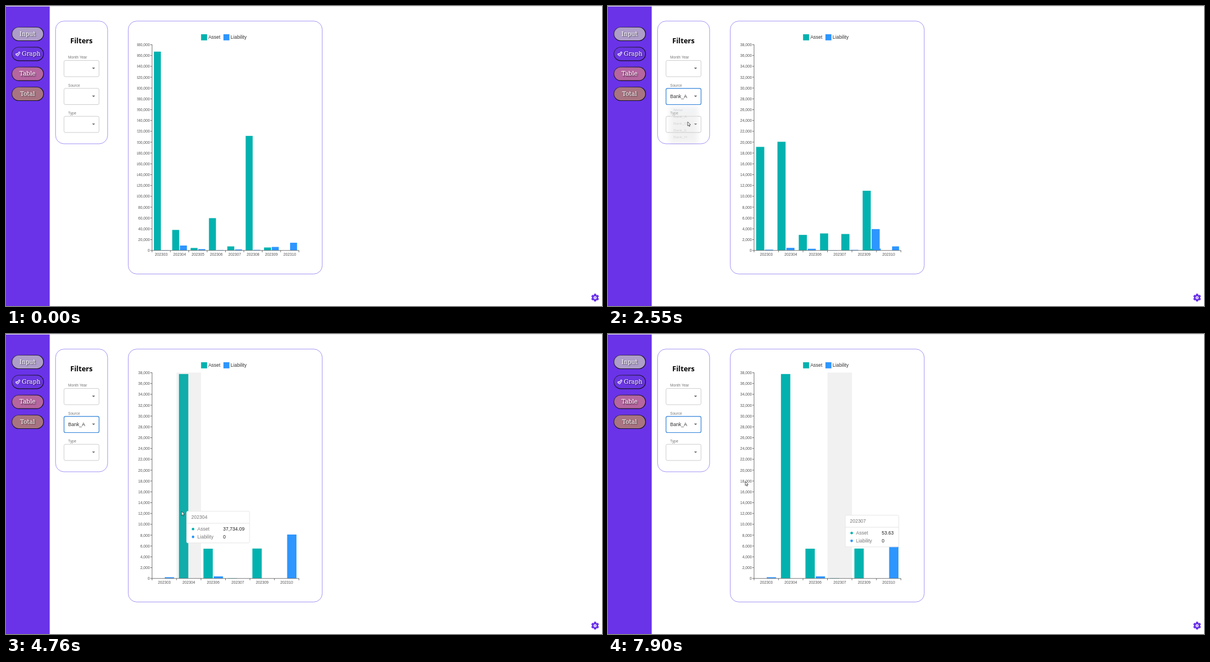
These frames come from a looping animation (1055 by 531 pixels, 8 s). An HTML page with a canvas:

```html
<!DOCTYPE html>
<html lang="en">
<head>
<meta charset="utf-8">
<title>Asset dashboard</title>
<style>
html, body { margin: 0; width: 100%; height: 100%; overflow: hidden; background: #fff; }
canvas { display: block; }
</style>
</head>
<body>
<canvas id="stage" width="1055" height="531"></canvas>
<script>
const ctx = document.getElementById('stage').getContext('2d');
const LOOP = 8000, ENTER = 460, OPEN = 1640, PICK = 2430, LEAVE = 7900, LAG = 60;
const PURPLE = '#6a33e8', OUTLINE = '#8f78f0', BLUE = '#2f82da', GREY = '#cdcdcd';
const COLORS = ['#02b2af', '#2e96ff'];
const SERIES = ['Asset', 'Liability'];
const SANS = '"Liberation Sans", Arial, sans-serif';
const PLOT = { left: 258.5, top: 68.3, width: 260, height: 364.2 };
PLOT.right = PLOT.left + PLOT.width;
PLOT.bottom = PLOT.top + PLOT.height;

// Asset and liability per month from 202303 on; null marks a month without entries.
const byMonth = pairs => pairs
  .map((pair, i) => pair && { month: 202303 + i, values: pair })
  .filter(Boolean);
const ALL = {
  tick: 20000,
  rows: byMonth([[367000, 500], [37734.09, 8900], [4400, 2300], [59500, 600],
    [7300, 1700], [211400, 900], [5300, 6300], [0, 14050]])
};
const BANK_A = {
  tick: 2000,
  rows: byMonth([[0, 206.83], [37734.09, 0], null, [5476.21, 362.15],
    [53.63, 0], null, [5503.18, 0], [0, 8094.37]])
};
const TICKS = 19;

// Pointer strokes; it rests between them.
const ENTRY = { x: 890, y: 421 };
const STROKES = [
  { from: ENTER, to: 1240, x: 143, y: 159 },
  { from: 1940, to: 2270, x: 141, y: 205 },
  { from: 2560, to: 3200, x: 260, y: 282 },
  { from: 3200, to: 3510, x: 270, y: 312 },
  { from: 4130, to: 4700, x: 310.8, y: 314 },
  { from: 5040, to: 5430, x: 363, y: 336.5 },
  { from: 6170, to: 6500, x: 411, y: 340.5 },
  { from: 6600, to: 7070, x: 446, y: 344 },
  { from: 7260, to: 7440, x: 503, y: 350 },
  { from: 7840, to: 7840, x: 411, y: 321 },
  { from: LEAVE, to: LEAVE, x: 243, y: 261 }
];

const clamp = v => Math.max(0, Math.min(1, v));
const mix = (a, b, p) => a + (b - a) * p;
const progress = (t, from, to) => to > from ? clamp((t - from) / (to - from)) : +(t >= to);
const easeOut = p => Math.sin(p * Math.PI / 2);

function pointer(t) {
  return STROKES.reduce((at, stroke) => {
    const p = easeOut(progress(t, stroke.from, stroke.to));
    return { x: mix(at.x, stroke.x, p), y: mix(at.y, stroke.y, p) };
  }, ENTRY);
}

function text(str, x, y, size, color, { align = 'left', style = '', family = SANS } = {}) {
  ctx.font = `${style} ${size}px ${family}`;
  ctx.textAlign = align;
  ctx.fillStyle = color;
  ctx.fillText(str, x, y);
}

function rect(x, y, w, h, color) {
  ctx.fillStyle = color;
  ctx.fillRect(x, y, w, h);
}

function box(x, y, w, h, r, fill, stroke, width = 1) {
  ctx.beginPath();
  ctx.roundRect(x, y, w, h, r);
  if (fill) { ctx.fillStyle = fill; ctx.fill(); }
  if (stroke) { ctx.strokeStyle = stroke; ctx.lineWidth = width; ctx.stroke(); }
}

function polygon(points, fill) {
  ctx.beginPath();
  points.forEach(([x, y]) => ctx.lineTo(x, y));
  ctx.closePath();
  ctx.fillStyle = fill;
  ctx.fill();
}

function line(x1, y1, x2, y2, color, width = .8) {
  ctx.beginPath();
  ctx.moveTo(x1, y1);
  ctx.lineTo(x2, y2);
  ctx.strokeStyle = color;
  ctx.lineWidth = width;
  ctx.stroke();
}

function dot(x, y, r, color) {
  ctx.beginPath();
  ctx.arc(x, y, r, 0, 7);
  ctx.fillStyle = color;
  ctx.fill();
}

function withShadow(color, blur, dx, dy, paint) {
  ctx.save();
  Object.assign(ctx, { shadowColor: color, shadowBlur: blur, shadowOffsetX: dx, shadowOffsetY: dy });
  paint();
  ctx.restore();
}

function button(label, y, fill, textX = 38) {
  const edge = ctx.createLinearGradient(10, y, 20, y + 25);
  edge.addColorStop(0, 'rgba(40,30,60,.6)');
  edge.addColorStop(1, '#16101f');
  box(10.5, y + .5, 56, 24, 12, fill, edge, 1.2);
  withShadow('rgba(0,0,0,.6)', 2, 1.3, 1.3, () =>
    text(label, textX, y + 15.8, 10.4, '#fff', { align: 'center', family: '"DejaVu Serif", serif' }));
}

function check(color, width) {
  ctx.beginPath();
  ctx.moveTo(18.6, 85.6);
  ctx.lineTo(20.4, 87);
  ctx.lineTo(23.4, 82.6);
  ctx.strokeStyle = color;
  ctx.lineWidth = width;
  ctx.stroke();
}

function sidebar() {
  rect(0, 0, 1055, 1, '#e6e6e8');
  rect(0, 1, 77.4, 530, PURPLE);
  button('Input', 37, '#ad9dc8');
  button('Graph', 72.3, '#6a35e2', 44.5);
  button('Table', 107.6, '#b5669f');
  button('Total', 143, '#a87482');
  ctx.save();
  ctx.lineCap = ctx.lineJoin = 'round';
  check('#fff', 3.4);
  check(PURPLE, 1.2);
  ctx.restore();
}

function gear() {
  ctx.save();
  ctx.translate(1042.8, 516.2);
  dot(0, 0, 5.2, PURPLE);
  for (let i = 0; i < 6; i++) {
    polygon([[-2.4, -4], [-1.6, -6.9], [1.6, -6.9], [2.4, -4]], PURPLE);
    ctx.rotate(Math.PI / 3);
  }
  dot(0, 0, 2.5, '#fff');
  dot(0, 0, 1, PURPLE);
  ctx.restore();
}

function select(label, slot, { border = GREY, width = 1, value = '', open = false } = {}) {
  const y = 96 + 49.4 * slot, arrowY = y + 14.4, s = open ? -1 : 1;
  text(label, 110, y - 2.8, 6.6, '#777');
  box(102.7, y + .4, 62, 28.7, 2.5, null, border, width);
  text(value, 110, y + 17.4, 8.6, '#333');
  polygon([[152.3, arrowY - 1.3 * s], [157.7, arrowY - 1.3 * s], [155, arrowY + 1.4 * s]], '#666');
}

function filters(t, at) {
  box(87.7, 26.7, 92.2, 217.2, 15, '#fff', OUTLINE, .8);
  text('Filters', 133.6, 66.3, 12.6, '#000', { align: 'center', style: 'bold', family: '"Open Sans", sans-serif' });
  const hover = at.x > 103 && at.x < 165 && at.y > 146 && at.y < 175;
  const focused = t >= OPEN;
  select('Month Year', 0);
  select('Source', 1, {
    border: focused ? BLUE : hover ? '#222' : GREY,
    width: focused ? 1.2 : 1,
    value: t >= PICK ? 'Bank_A' : '',
    open: focused && t < PICK
  });
  select('Type', 2);
}

function menu(t, at) {
  const shown = easeOut(progress(t, OPEN, OPEN + 200)) - easeOut(progress(t, PICK, PICK + 200));
  if (shown <= 0) return;
  ctx.save();
  ctx.globalAlpha = shown;
  ctx.translate(134, 176);
  ctx.scale(mix(.75, 1, shown), mix(.56, 1, shown));
  ctx.translate(-134, -176);
  withShadow('rgba(0,0,0,.36)', 7, 0, 2, () => box(103, 176.5, 62, 99.5, 2, '#fff'));
  rect(103, 179, 62, 18.6, '#edf4fb');
  ['None', 'Bank_A', 'Bank_C', 'Bank_E', 'Bank_H'].forEach((name, i) => {
    const y = 179 + 18.6 * i;
    if (i && at.y >= y && at.y < y + 18.6) rect(103, y, 62, 18.6, '#f5f5f5');
    text(name, 111, y + 12.3, 8.6, i ? '#555' : '#333', { style: i ? '' : 'italic' });
  });
  ctx.restore();
}

const bandWidth = data => PLOT.width / data.rows.length;

function barShape(data, i, series) {
  const step = bandWidth(data), w = step * .8 / 2.1;
  return {
    x: PLOT.left + step * (i + .1) + series * w * 1.1,
    w,
    h: data.rows[i].values[series] / (data.tick * TICKS) * PLOT.height
  };
}

// Bars settle like a critically damped spring after the pick.
function bars(t) {
  const s = Math.max(0, t - PICK) / 75;
  const p = 1 - (1 + s) * Math.exp(-s);
  ALL.rows.forEach((_, i) => COLORS.forEach((color, series) => {
    const a = barShape(ALL, i, series);
    const b = BANK_A.rows[i] ? barShape(BANK_A, i, series) : { ...a, h: 0 };
    const h = mix(a.h, b.h, p);
    if (h > .05) rect(mix(a.x, b.x, p), PLOT.bottom - h, mix(a.w, b.w, p), h, color);
  }));
}

function axes(data) {
  const ink = '#555', step = bandWidth(data);
  line(PLOT.left, PLOT.top - .3, PLOT.left, PLOT.bottom + .5, ink);
  line(PLOT.left, PLOT.bottom + .2, PLOT.right, PLOT.bottom + .2, ink);
  ctx.save();
  ctx.beginPath();
  ctx.rect(232, 40, 310, 420);
  ctx.clip();
  for (let i = 0; i <= TICKS; i++) {
    const y = mix(PLOT.bottom, PLOT.top, i / TICKS) + .2;
    line(255.3, y, PLOT.left, y, ink);
    text((data.tick * i).toLocaleString('en-US'), 254.6, y + 2.5, 6.75, ink, { align: 'right' });
  }
  data.rows.forEach(({ month }, i) =>
    text(month, PLOT.left + step * (i + .5), 442, 6.75, ink, { align: 'center' }));
  for (let i = 0; i <= data.rows.length; i++) {
    const x = PLOT.left + step * i;
    line(x, PLOT.bottom, x, PLOT.bottom + 3.4, ink);
  }
  ctx.restore();
}

function tooltip(at, { month, values }) {
  const labels = values.map(v => v.toLocaleString('en-US'));
  ctx.font = `8.5px ${SANS}`;
  const width = 73.5 + Math.max(...labels.map(label => ctx.measureText(label).width));
  ctx.save();
  ctx.translate(at.x + 8.5, at.y - .7);
  box(.5, .5, width, 56, 2, '#fff', '#e6e6e6');
  line(.5, 21.7, width + .5, 21.7, '#e4e4e4', 1);
  text(month, 8.7, 13.9, 8.5, '#777');
  SERIES.forEach((name, i) => {
    const y = 32 + 13.8 * i;
    dot(11.8, y, 2.3, COLORS[i]);
    text(name, 19.5, y + 3, 8.5, '#777');
    text(labels[i], 65, y + 3, 8.5, '#222');
  });
  ctx.restore();
}

function chart(t) {
  const data = t < PICK ? ALL : BANK_A;
  box(216.4, 26.7, 343.4, 447.6, 15, '#fff', OUTLINE, .8);
  SERIES.forEach((name, i) => {
    rect(345.3 + 39.6 * i, 50, 10.6, 10.8, COLORS[i]);
    text(name, 358.2 + 39.4 * i, 58.4, 8.5, '#333');
  });
  bars(t);

  // The tooltip trails the pointer and keeps its last place once the pointer leaves the plot.
  const at = pointer(Math.min(t, LEAVE) - LAG);
  const active = at.x > PLOT.left && at.x < PLOT.right && at.y > PLOT.top && at.y < PLOT.bottom;
  const step = bandWidth(data), index = Math.floor((at.x - PLOT.left) / step);
  if (active) rect(PLOT.left + step * index, PLOT.top, step, PLOT.height, 'rgba(128,128,128,.11)');
  axes(data);
  if (active) tooltip(at, data.rows[index]);
}

function arrow(at) {
  ctx.save();
  ctx.translate(at.x, at.y);
  polygon([[0, 0], [0, 7.2], [1.7, 5.7], [2.8, 8.2], [4, 7.6], [3, 5.3], [5.2, 5.1]], '#fff');
  ctx.strokeStyle = '#333';
  ctx.lineWidth = .8;
  ctx.stroke();
  ctx.restore();
}

function draw(t) {
  const at = pointer(t);
  rect(0, 0, 1055, 531, '#fff');
  sidebar();
  filters(t, at);
  chart(t);
  menu(t, at);
  gear();
  if (t >= ENTER) arrow(at);
}

const start = performance.now();
function tick() {
  draw((performance.now() - start) % LOOP);
  requestAnimationFrame(tick);
}
tick();
</script>
</body>
</html>
```
